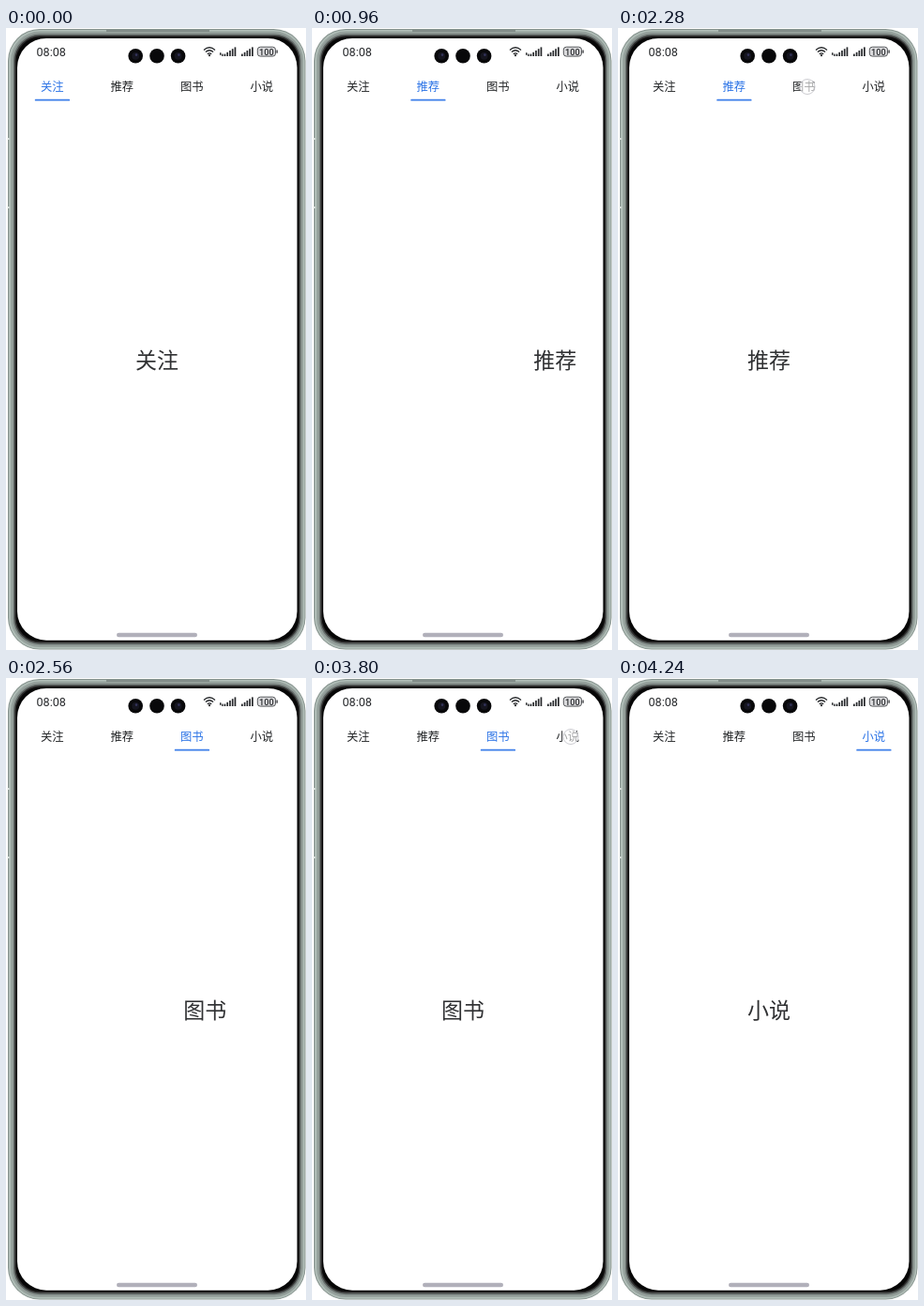
These frames come from a looping animation (320x662 px, 5080 ms). An HTML page:

```html
<!DOCTYPE html>
<html lang="zh-CN">
<head>
<meta charset="utf-8">
<title>Tabs</title>
<style>
html, body { margin: 0; width: 100%; height: 100%; overflow: hidden; background: #fff; }
svg { display: block; width: 100vw; height: 100vh; }
text { font-family: "Noto Sans CJK SC", "Noto Sans CJK", "Noto Sans", sans-serif; text-anchor: middle; }
.tab { font-size: 12.3px; font-weight: 500; }
.page { font-size: 23px; fill: #303133; }
.status { font-family: Roboto, "Noto Sans", sans-serif; fill: #25272a; }
</style>
</head>
<body>
<svg id="stage" viewBox="0 0 320 662" preserveAspectRatio="none">
  <defs>
    <clipPath id="view"><rect x="8.5" y="80" width="304" height="560"/></clipPath>
  </defs>
  <g id="body"></g>
  <path d="M107 3H217" stroke="#757f7b" stroke-width="1.6"/>
  <path d="M2.5 117v2M2.5 190v2" stroke="#dfe5e2" stroke-width="2"/>
  <rect x="12" y="11" width="298.5" height="640.7" rx="31" fill="#fff"/>
  <g id="pages" clip-path="url(#view)"></g>
  <rect x="118" y="643.7" width="86" height="4.6" rx="2.3" fill="#b1b0ba"/>
  <g id="tabs"></g>
  <rect id="line" y="75.8" width="37.2" height="1.8" rx=".6" fill="#3c7ee9"/>
  <circle id="touch" cy="62.5" r="8" fill="#fff" fill-opacity=".6" stroke="#c6c6cb" stroke-width=".9"/>
  <text class="status" x="48.2" y="29.8" font-size="12.6">08:08</text>
  <g id="cameras"></g>
  <g fill="none" stroke="#25272a" stroke-width="1.3">
    <path d="M211 23.4Q217 18.2 223 23.4M212.9 25.6Q217 22 221.1 25.6M214.8 27.7Q217 25.9 219.2 27.7"/>
    <rect x="268.3" y="20.2" width="19.2" height="9.9" rx="3" fill="#dcdcde" stroke="#55575a" stroke-width="1"/>
    <path d="M289.1 23.6v3.2" stroke-width="1.2"/>
  </g>
  <circle cx="217" cy="29.2" r="1.1" fill="#25272a"/>
  <g id="bars" fill="#25272a"></g>
  <text class="status" x="277.9" y="28.6" font-size="9.2" font-weight="500">100</text>
</svg>
<script>
const LOOP = 5080, STEP = 40, SLIDE = 370, PAGE = 299, CENTER = 161;
const NAMES = ["关注", "推荐", "图书", "小说"];
const TAPS = [
  { down: 680, start: 837, x: 127 },
  { down: 2280, start: 2385, x: 202 },
  { down: 3800, start: 3878, x: 276 }
];
const tabX = i => 49.2 + i * 74.5;

const get = id => document.getElementById(id);
function add(parent, tag, attrs, text = "") {
  const el = document.createElementNS("http://www.w3.org/2000/svg", tag);
  for (const key in attrs) el.setAttribute(key, attrs[key]);
  el.textContent = text;
  return get(parent).appendChild(el);
}

// Nested rims of the phone: left, top, right, bottom, corner radius, colour
[
  [2, 1, 319.5, 661.5, 34, "#84918c"],
  [3, 2, 318.6, 660.7, 33, "#b0bdb7"],
  [5, 3.6, 317, 659, 31, "#97a39e"],
  [6.8, 5, 315.8, 657.6, 29, "#8f9995"],
  [8, 6.6, 314.5, 656.2, 28, "#626967"],
  [9.3, 8, 313.3, 654.6, 27, "#2b2a2a"],
  [10.6, 9.6, 312.2, 653, 26, "#060606"]
].forEach(([x, y, r, b, rx, fill]) =>
  add("body", "rect", { x, y, width: r - x, height: b - y, rx, fill }));

[138.2, 161, 183.6].forEach((cx, i) => {
  add("cameras", "circle", { cx, cy: 29.8, r: 7.8, fill: "#08080a" });
  if (i === 1) return;
  add("cameras", "circle", { cx, cy: 29.8, r: 4, fill: "#15151f" });
  add("cameras", "circle", { cx: cx + 0.8, cy: 28.6, r: 1.3, fill: "#34345c" });
});

function signal(x) {
  for (let i = 0; i < 5; i++) {
    const height = 2.4 + i * 1.8;
    add("bars", "rect", { x: x + i * 2.75, y: 30 - height, width: 1.7, height });
  }
}
signal(232.6);
signal(251);
add("bars", "rect", { x: 228, y: 26.3, width: 1.5, height: 2.5 });
add("bars", "rect", { x: 230.2, y: 27.6, width: 1.4, height: 2.4 });

const tabs = NAMES.map((name, i) => add("tabs", "text", { class: "tab", x: tabX(i), y: 67 }, name));
const pages = NAMES.map(name => add("pages", "text", { class: "page", y: 362 }, name));

// cubic-bezier(0.2, 0, 0.1, 1)
function ease(x) {
  if (x <= 0) return 0;
  if (x >= 1) return 1;
  let lo = 0, hi = 1;
  for (let i = 0; i < 24; i++) {
    const s = (lo + hi) / 2, r = 1 - s;
    if (0.6 * s * r * r + 0.3 * s * s * r + s * s * s < x) lo = s; else hi = s;
  }
  return lo * lo * (3 - 2 * lo);
}

function draw(time) {
  const t = Math.floor((time % LOOP) / STEP) * STEP;
  const position = TAPS.reduce((sum, tap) => sum + ease((t - tap.start) / SLIDE), 0);
  const active = TAPS.filter(tap => t >= tap.start).length;
  const tap = TAPS.find(p => t >= p.down && t < p.start);

  pages.forEach((page, i) => page.setAttribute("x", CENTER + (i - position) * PAGE));
  tabs.forEach((tab, i) => tab.setAttribute("fill", i === active ? "#2b73e6" : "#222426"));
  get("line").setAttribute("x", tabX(active) - 18.4);
  get("touch").setAttribute("visibility", tap ? "visible" : "hidden");
  if (tap) get("touch").setAttribute("cx", tap.x);
}

const origin = performance.now();
function tick() {
  draw(performance.now() - origin);
  requestAnimationFrame(tick);
}
draw(0);
requestAnimationFrame(tick);
</script>
</body>
</html>
```
